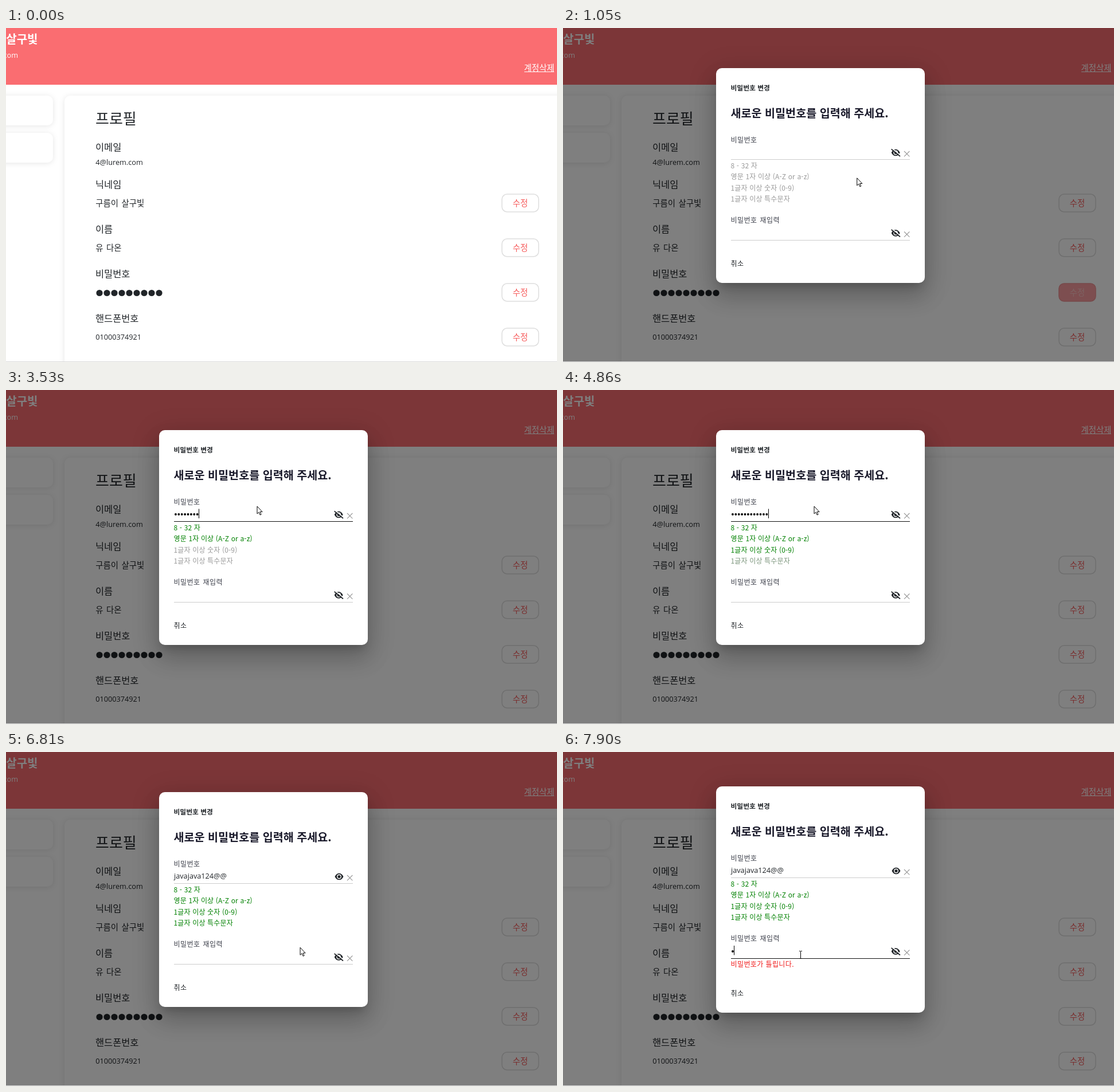
An HTML page for the animation above (8 s loop, 961 by 583 pixels).

```html
<!DOCTYPE html>
<html lang="ko">
<head>
<meta charset="utf-8">
<style>
html, body { margin: 0; width: 100%; height: 100%; overflow: hidden; background: #fff }
svg { display: block }
text { font: 14.4px "Noto Sans CJK KR", "Noto Sans CJK", sans-serif; fill: #212529; white-space: pre }
.latin { font: 12.7px "Open Sans", sans-serif }
.title { font-size: 26px; font-weight: 500 }
.head { font-size: 16.4px; font-weight: 500 }
.value { word-spacing: 1.5px }
.white { fill: #fff }
.red { fill: #f65a5a }
.ask { font-size: 19.6px; font-weight: 700; fill: #1a1a2b }
.small { font-size: 12px; letter-spacing: .5px; word-spacing: 1px; fill: #3c3f4a }
.rule { font-size: 12px; letter-spacing: .15px }
.card { fill: #fff; filter: drop-shadow(0 1px 5px rgba(0,0,0,.1)) }
foreignObject { overflow: visible }
#box {
  width: 364px; border-radius: 10px; background: #fff;
  box-shadow: 0 11px 15px -7px rgba(0,0,0,.2), 0 24px 38px 3px rgba(0,0,0,.14), 0 9px 46px 8px rgba(0,0,0,.12);
}
</style>
</head>
<body>
<svg id="stage" width="961" height="583" viewBox="0 0 961 583">
  <defs>
    <g id="eye">
      <path d="M573.5 217.5C577 209.7 585 209.7 588.5 217.5C585 225.3 577 225.3 573.5 217.5Z" fill="#212529"/>
      <circle cx="581" cy="217.5" r="3.9" fill="#fff"/>
      <circle cx="581" cy="217.5" r="2.6" fill="#212529"/>
    </g>
    <g id="slashed">
      <use href="#eye" x="-.8"/>
      <path d="M573.6 210.2L589 222.4" stroke="#fff" stroke-width="1.6"/>
      <path d="M572.6 211.4L588 224" stroke="#212529" stroke-width="1.7"/>
    </g>
    <path id="clear" d="M595 215l9.4 9.4m0-9.4l-9.4 9.4" stroke="#999" stroke-width="1.1"/>
  </defs>

  <rect width="961" height="99" fill="#fa6d71"/>
  <text x="55.5" y="26.5" text-anchor="end" class="white" style="font-size:20px;font-weight:700">살구빛</text>
  <text x="21" y="52" text-anchor="end" class="latin white">com</text>
  <text x="903.5" y="75" class="white">계정삭제</text>
  <path d="M904 76.5H956" stroke="#fff"/>
  <rect class="card" x="-40" y="118" width="122" height="52" rx="10"/>
  <rect class="card" x="-40" y="183" width="122" height="52" rx="10"/>
  <rect class="card" x="102" y="118" width="900" height="520" rx="10"/>
  <text x="156" y="168" class="title">프로필</text>
  <g id="profile"></g>

  <g id="dialog">
    <rect width="961" height="583" fill="#000" opacity=".5"/>
    <g id="panel">
      <foreignObject x="267" y="70" width="364" height="395"><div id="box"></div></foreignObject>
      <text x="292.5" y="109" style="font-size:11.8px;font-weight:700">비밀번호 변경</text>
      <text x="292.5" y="156" class="ask">새로운 비밀번호를 입력해 주세요.</text>
      <text x="292.5" y="199.5" class="small">비밀번호</text>
      <text x="292.5" y="340" class="small">비밀번호 재입력</text>
      <g id="rules"></g>
      <path id="line1" d="M293 229.5H605"/>
      <path id="line2" d="M293 370.5H605"/>
      <use href="#clear"/>
      <use href="#clear" y="140.5"/>
      <use id="hidden" href="#slashed"/>
      <use id="shown" href="#eye"/>
      <use href="#slashed" y="140.5"/>
      <g id="dots"></g>
      <text id="plain" x="293" y="221" class="latin">javajava124@@</text>
      <circle id="dot2" cx="295.9" cy="358" r="1.9"/>
      <path id="caret" stroke="#000"/>
      <text id="error" x="292.5" y="385" class="rule" style="fill:#f01818;letter-spacing:.4px">비밀번호가 틀립니다.</text>
      <text id="cancel" x="292.5" y="415.5" class="small" style="fill:#212529">취소</text>
    </g>
  </g>
  <path d="M0 582.5H961" stroke="#d9d9d9"/>

  <path id="arrow" d="M.5 .5V13.6L3.4 10.9L5.6 15.6L7.6 14.7L5.4 10.2H9.6Z" fill="#fff" stroke="#000"/>
  <path id="beam" d="M-2.5-6.5H-.8L0-6L.8-6.5H2.5M0-6V6M-2.5 6.5H-.8L0 6L.8 6.5H2.5" fill="none" stroke="#000"/>
</svg>
<script>
const LOOP = 8000, OPEN = 1050, FOCUS = 1500, REVEAL = 6420, FOCUS2 = 7360, ERROR = 7900;
const keys = [1900, 2240, 2440, 2590, 2840, 2990, 3120, 3320, 3790, 3930, 4460, 4860, 5070];
const rules = [['8 - 32 자', 3320], ['영문 1자 이상 (A-Z or a-z)', 1900],
  ['1글자 이상 숫자 (0-9)', 3790], ['1글자 이상 특수문자', 4860]];
const fields = [['이메일', 214, '4@lurem.com', 239, 'latin'], ['닉네임', 279, '구름이 살구빛', 311, 'value'],
  ['이름', 357, '유 다온', 389, 'value'], ['비밀번호', 435], ['핸드폰번호', 513, '01000374921', 544, 'latin']];
// time, x, y of the pointer
const path = [[330, 838, 543], [440, 872, 532], [560, 890, 492], [680, 897, 463], [880, 897, 463],
  [990, 651, 347], [1050, 512.5, 261.5], [1250, 462, 228], [1400, 448, 220], [1520, 446, 219], [1640, 437.5, 202.5],
  [5600, 437.5, 202.5], [5780, 470, 210], [6070, 538.5, 220], [6290, 577, 226], [6570, 577, 226],
  [6750, 540, 320], [6950, 450, 388], [7150, 395, 378], [7360, 391, 363], [7500, 414.5, 354]];

const $ = id => document.getElementById(id);
const add = (id, html) => $(id).insertAdjacentHTML('beforeend', html);
const show = (id, on) => $(id).setAttribute('visibility', on ? 'inherit' : 'hidden');
const set = (id, name, value) => $(id).setAttribute(name, value);
const ramp = (t, from, to) => Math.min(1, Math.max(0, (t - from) / (to - from)));

for (const [name, y, value, base, type] of fields) {
  add('profile', `<text x="156" y="${y}" class="head">${name}</text>`);
  if (value) add('profile', `<text x="156.3" y="${base}" class="${type}">${value}</text>`);
}
for (let i = 0; i < 9; i++) add('profile', `<circle cx="${163 + 13 * i}" cy="462.5" r="5.6" fill="#212529"/>`);
for (let i = 0; i < 4; i++) {
  const y = 305.5 + 78 * i;
  const button = (fill, stroke, color) =>
    `<rect x="865" y="${y - 15.5}" width="64" height="31" rx="9" fill="${fill}" stroke="${stroke}" stroke-width="1.5"/>
     <text x="897" y="${y + 5}" text-anchor="middle" class="${color}">수정</text>`;
  add('profile', button('#fff', '#dedede', 'red') + `<g id="hover${i}">${button('#fa6d71', '#fa6d71', 'white')}</g>`);
  set('hover' + i, 'opacity', 0);
}
rules.forEach(([label], i) =>
  add('rules', `<text id="rule${i}" x="292.5" y="${244.5 + 19.5 * i}" class="rule">${label}</text>`));
keys.forEach((_, i) => add('dots', `<circle id="dot${i}a" cx="${295.9 + 5.4 * i}" cy="217" r="1.9"/>`));

function pointer(t) {
  const next = path.findIndex(p => p[0] > t);
  if (next < 0) return path[path.length - 1].slice(1);
  if (next === 0) return null;
  const [t0, x0, y0] = path[next - 1], [t1, x1, y1] = path[next], p = ramp(t, t0, t1);
  return [x0 + (x1 - x0) * p, y0 + (y1 - y0) * p];
}

function draw(t) {
  set('hover3', 'opacity', ramp(t, 420, 540) - ramp(t, 560, 760));
  set('hover2', 'opacity', ramp(t, 600, 750) - ramp(t, 1000, 1150));
  show('dialog', t >= OPEN);
  // HTML inside the SVG needs its own switch
  $('dialog').style.display = t >= OPEN ? '' : 'none';

  const first = t >= FOCUS && t < REVEAL, second = t >= FOCUS2, wrong = t >= ERROR;
  const typed = keys.filter(k => t >= k).length;
  keys.forEach((_, i) => show(`dot${i}a`, i < typed && t < REVEAL));
  rules.forEach(([, at], i) =>
    $('rule' + i).style.fill = `color-mix(in srgb, #008000 ${100 * ramp(t, at - 50, at + 200)}%, #999)`);
  for (const id of ['shown', 'plain']) show(id, t >= REVEAL);
  show('hidden', t < REVEAL);
  set('line1', 'stroke', first ? '#111' : '#ccc');
  set('line2', 'stroke', second ? '#111' : '#ccc');

  // The caret blinks from the last key press
  const last = second ? (wrong ? ERROR : FOCUS2) : typed ? keys[typed - 1] : FOCUS;
  show('caret', (first || second) && (t - last) % 1060 < 530);
  const column = second ? +wrong : typed;
  set('caret', 'd', `M${Math.round(293 + 5.4 * column) + .5} ${second ? 348 : 207.5}v16.5`);

  set('panel', 'transform', `translate(0 ${wrong ? -10 : 0})`);
  $('box').style.height = (wrong ? 395 : 375) + 'px';
  set('cancel', 'y', wrong ? 435.5 : 415.5);
  show('dot2', wrong);
  show('error', wrong);

  const at = pointer(t);
  let inField = false;
  if (at) {
    const [x, y] = at;
    inField = t >= OPEN && x > 293 && x < 568 && (y > 207 && y < 230 || y > 346 && y < 370);
    for (const id of ['arrow', 'beam']) set(id, 'transform', `translate(${x} ${y})`);
  }
  show('arrow', at && !inField);
  show('beam', inField);
}

const start = performance.now();
function tick() {
  draw((performance.now() - start) % LOOP);
  requestAnimationFrame(tick);
}
tick();
</script>
</body>
</html>
```
